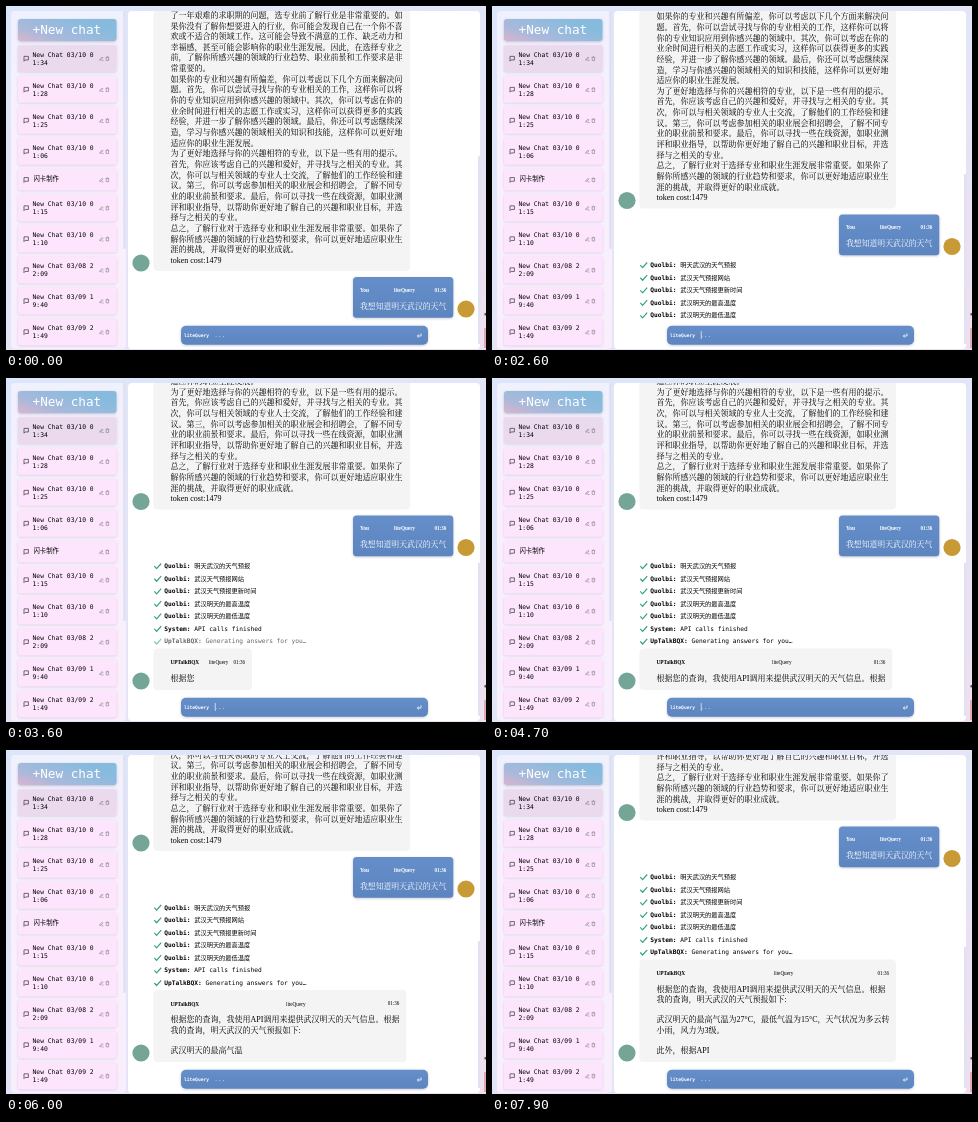
An HTML page that plays this animation: 480x344 px, repeating every 8000 ms.

```html
<!DOCTYPE html>
<html lang="zh">
<head>
<meta charset="utf-8">
<title>Chat</title>
<style>
html, body { margin: 0; width: 100%; height: 100%; overflow: hidden; background: #e4e8f8; }
svg { display: block; width: 100%; height: 100%; }
text { white-space: pre; }
.mono { font-family: "DejaVu Sans Mono", "Noto Sans CJK SC", monospace; }
.serif { font-family: "Liberation Serif", "Noto Serif CJK SC", "Noto Sans CJK SC", serif; }
.b { font-weight: bold; }
</style>
</head>
<body>
<svg id="stage" viewBox="0 0 480 344" preserveAspectRatio="none">
  <defs>
    <linearGradient id="page" x2="1" y2="1">
      <stop offset="0" stop-color="#dce6fa"/><stop offset=".6" stop-color="#e5e5f7"/><stop offset="1" stop-color="#efdfee"/>
    </linearGradient>
    <linearGradient id="side" x2="0" y2="1">
      <stop offset="0" stop-color="#eff1fc"/><stop offset=".35" stop-color="#f9effd"/><stop offset="1" stop-color="#f8eefc"/>
    </linearGradient>
    <linearGradient id="button" x1="0" y1="1" x2=".9" y2=".4">
      <stop offset="0" stop-color="#dcb4cc"/><stop offset=".35" stop-color="#aab9db"/><stop offset="1" stop-color="#86bbde"/>
    </linearGradient>
    <linearGradient id="blue" x2="0" y2="1">
      <stop offset="0" stop-color="#668fca"/><stop offset="1" stop-color="#5c85c0"/>
    </linearGradient>
    <filter id="shadow" x="-10%" y="-30%" width="120%" height="170%">
      <feDropShadow dx="0" dy="0.8" stdDeviation="1.2" flood-color="#4a4a70" flood-opacity=".32"/>
    </filter>
    <filter id="soft" x="-10%" y="-30%" width="120%" height="170%">
      <feDropShadow dx="0" dy="0.6" stdDeviation=".8" flood-color="#8a6a9a" flood-opacity=".3"/>
    </filter>
    <clipPath id="view"><rect x="122" y="5" width="352" height="338" rx="4"/></clipPath>
    <clipPath id="sideView"><rect x="5" y="5" width="115" height="338"/></clipPath>
  </defs>
  <rect width="480" height="344" fill="url(#page)"/>
  <rect x="478" y="322" width="2" height="20" fill="#e0a9b4"/>
  <rect x="478.5" y="307" width="1.5" height="2.5" fill="#555"/>
  <rect x="5" y="5" width="115" height="338" rx="4" fill="url(#side)"/>
  <g id="sidebar" clip-path="url(#sideView)"></g>
  <rect x="122" y="5" width="352" height="338" rx="4" fill="#fff"/>
  <rect id="thumb" x="472" width="2.4" rx="1" fill="#e0e2f4"/>
  <g clip-path="url(#view)"><g id="chat"></g></g>
  <g id="input"></g>
</svg>
<script>
const BOT = "UPTalkBQX", MODE = "liteQuery", ENGINE = "Quolbi";
const LOOP = 8000;

const ARTICLE = `了一年艰难的求职期的问题，选专业前了解行业是非常重要的。如
果你没有了解你想要进入的行业，你可能会发现自己在一个你不喜
欢或不适合的领域工作。这可能会导致不满意的工作、缺乏动力和
幸福感，甚至可能会影响你的职业生涯发展。因此，在选择专业之
前，了解你所感兴趣的领域的行业趋势、职业前景和工作要求是非
常重要的。
如果你的专业和兴趣有所偏差，你可以考虑以下几个方面来解决问
题。首先，你可以尝试寻找与你的专业相关的工作，这样你可以将
你的专业知识应用到你感兴趣的领域中。其次，你可以考虑在你的
业余时间进行相关的志愿工作或实习，这样你可以获得更多的实践
经验，并进一步了解你感兴趣的领域。最后，你还可以考虑继续深
造，学习与你感兴趣的领域相关的知识和技能，这样你可以更好地
适应你的职业生涯发展。
为了更好地选择与你的兴趣相符的专业，以下是一些有用的提示。
首先，你应该考虑自己的兴趣和爱好，并寻找与之相关的专业。其
次，你可以与相关领域的专业人士交流，了解他们的工作经验和建
议。第三，你可以考虑参加相关的职业展会和招聘会，了解不同专
业的职业前景和要求。最后，你可以寻找一些在线资源，如职业测
评和职业指导，以帮助你更好地了解自己的兴趣和职业目标，并选
择与之相关的专业。
总之，了解行业对于选择专业和职业生涯发展非常重要。如果你了
解你所感兴趣的领域的行业趋势和要求，你可以更好地适应职业生
涯的挑战，并取得更好的职业成就。
token cost:1479`.split("\n");

// Search steps: label, text, start and length of the fade
const STEPS = [
  ...["明天武汉的天气预报", "武汉天气预报网站", "武汉天气预报更新时间", "武汉明天的最高温度", "武汉明天的最低温度"]
    .map(q => [ENGINE, q, 1780, 700]),
  ["System", "API calls finished", 2800, 500],
  ["UpTalkBQX", "Generating answers for you…", 3300, 500]
];

// Reply lines with their offset from the end of the article
const REPLY = [
  ["根据您的查询，我使用API调用来提供武汉明天的天气信息。根据", 179.5],
  ["我的查询，明天武汉的天气预报如下:", 190],
  ["武汉明天的最高气温为27°C，最低气温为15°C，天气状况为多云转", 210],
  ["小雨，风力为3级。", 220.5],
  ["此外，根据API", 240.5]
];
const REPLY_START = 3500;
const TYPING = [[3500, 1], [3600, 3], [4700, 30], [6000, 56], [7100, 78], [7900, 97]];

const $ = id => document.getElementById(id);
const clamp = v => Math.max(0, Math.min(1, v));

function add(parent, tag, attrs, content) {
  const el = document.createElementNS("http://www.w3.org/2000/svg", tag);
  for (const key in attrs) el.setAttribute(key, attrs[key]);
  if (content !== undefined) el.textContent = content;
  return parent.appendChild(el);
}
// y is the middle of the line
function label(parent, x, y, size, str, cls = "serif", fill = "#000", more = {}) {
  return add(parent, "text", { x, y: y + size * 0.35, "font-size": size, class: cls, fill, ...more }, str);
}
const box = (parent, x, y, width, height, rx, fill, more = {}) =>
  add(parent, "rect", { x, y, width, height, rx, fill, ...more });
const line = (parent, d, stroke, width) =>
  add(parent, "path", { d, stroke, "stroke-width": width, fill: "none", "stroke-linejoin": "round" });
const avatar = (parent, cx, cy, fill) => add(parent, "circle", { cx, cy, r: 8.6, fill });
const SHADOW = { filter: "url(#shadow)" }, SOFT = { filter: "url(#soft)" };

function buildSidebar() {
  const g = $("sidebar");
  box(g, 12, 13, 98.5, 22, 3, "url(#button)", SHADOW);
  label(g, 26.5, 24, 12.7, "+New chat", "mono", "#fff");
  const chats = ["03/10 01:34", "03/10 01:28", "03/10 01:25", "03/10 01:06", "闪卡制作",
    "03/10 01:15", "03/10 01:10", "03/08 22:09", "03/09 19:40", "03/09 21:49"];
  let y = 39.3;
  chats.forEach((name, i) => {
    const dated = name.includes("/"), h = dated ? 26.5 : 21, mid = y + h / 2;
    box(g, 12, y, 98.5, h, 2, i ? "#fde6fd" : "#ebdaee", SOFT);
    if (dated) {
      label(g, 26.5, mid - 4.2, 6.35, "New Chat " + name.slice(0, 7), "mono");
      label(g, 26.5, mid + 4.1, 6.35, name.slice(7), "mono");
    } else label(g, 27.5, mid - 0.6, 6.35, name, "mono");
    line(g, `M18 ${mid + 2.6}v-4.8h4.4v3.6h-3.2z`, "#333", 0.7);
    line(g, `M93.7 ${mid + 1.7}l.4-1.2 2-2 .8.8-2 2zM95.5 ${mid + 2}h2`, "#666", 0.5);
    line(g, `M99.7 ${mid - 1.3}h3.4M100.2 ${mid - 1.3}v3.2h2.4v-3.2M100.9 ${mid - 2}h1`, "#666", 0.5);
    y += h + 4.5;
  });
  box(g, 117.2, 5, 2.6, 238, 1, "#e0e0f2");
}

// Everything in the chat is placed relative to the article's last line at y = 0
const parts = {};
function buildChat() {
  const g = $("chat");
  const last = ARTICLE.length - 1;
  box(g, 147.5, -300, 256.5, 311, 4, "#f4f4f4");
  ARTICLE.forEach((str, i) => label(g, 164.5, (i - last) * 10.65, 8, str));
  avatar(g, 135, 3, "#75a596");

  box(g, 347, 17, 100.3, 40.8, 3.5, "url(#blue)", SHADOW);
  label(g, 354, 30, 5.4, "You", "serif b", "#fff");
  label(g, 388, 30, 5.2, MODE, "serif b", "#fff");
  label(g, 440.3, 30, 5.1, "01:36", "serif b", "#fff", { "text-anchor": "end" });
  label(g, 354, 46, 7.85, "我想知道明天武汉的天气", "serif", "#fff");
  avatar(g, 460, 49, "#c79a35");

  parts.steps = STEPS.map(([who, what], i) => {
    const y = 67.5 + i * 12.55, step = add(g, "g", {});
    line(step, `M148.3 ${y + 0.2}l2.3 2.5 4.6-5.2`, "#36a37a", 1.2);
    const t = label(step, 158.3, y, 6.22, "", "mono");
    add(t, "tspan", { class: "b" }, who + ": ");
    add(t, "tspan", {}, what);
    return step;
  });

  const r = parts.reply = add(g, "g", {});
  parts.bubble = box(r, 147.5, 150, 98.5, 41, 4, "#f4f4f4");
  label(r, 164.5, 163.7, 5.3, BOT, "serif b");
  parts.mode = label(r, 203, 163.7, 5.2, MODE);
  parts.time = label(r, 239, 163.7, 5.1, "01:36", "serif", "#000", { "text-anchor": "end" });
  parts.lines = REPLY.map(([, y]) => label(r, 164.5, y, 8, ""));
  parts.face = avatar(r, 135, 182, "#75a596");
}

function buildInput() {
  const g = $("input");
  box(g, 175, 319.8, 247, 19, 5, "url(#blue)", SHADOW);
  label(g, 178, 329, 4.62, MODE, "mono b", "#fff");
  label(g, 208.3, 328.7, 6, "...", "mono", "#d3def0");
  parts.caret = box(g, 208.8, 325, 0.8, 8, 0, "#dfe8f6");
  line(g, "M415 327.4v2.6h-3.6M412.8 328.6l-1.5 1.4 1.5 1.4", "#fff", 0.8);
}

function typed(t) {
  for (let i = 1; i < TYPING.length; i++) {
    const [t0, n0] = TYPING[i - 1], [t1, n1] = TYPING[i];
    if (t <= t1) return Math.floor(n0 + (n1 - n0) * (t - t0) / (t1 - t0) + 1e-6);
  }
  return TYPING[TYPING.length - 1][1];
}

function drawReply(t) {
  let left = typed(t), end = 0, width = 0;
  REPLY.forEach(([str, y], i) => {
    const n = Math.max(0, Math.min(left, str.length));
    parts.lines[i].textContent = str.slice(0, n);
    if (n) {
      end = y;
      width = Math.max(width, parts.lines[i].getComputedTextLength());
    }
    left -= str.length;
  });
  const right = Math.max(239, Math.min(397, 164.5 + width));
  parts.bubble.setAttribute("width", right + 7 - 147.5);
  parts.bubble.setAttribute("height", end + 12 - 150);
  parts.time.setAttribute("x", right);
  parts.mode.setAttribute("x", 198 + (right - 164.5 - 65) / 2);
  parts.face.setAttribute("cy", end + 3);
  return 300 - end;
}

function update(now) {
  const t = Math.floor((now % LOOP) / 100) * 100;
  let shown = 0;
  STEPS.forEach(([, , start, length], i) => {
    if (t >= start) shown++;
    parts.steps[i].setAttribute("opacity", clamp((t - start) / length));
  });
  const replying = t >= REPLY_START;
  parts.reply.style.display = replying ? "" : "none";
  const base = replying ? drawReply(t) : 254 - 12.5 * shown;
  $("chat").setAttribute("transform", `translate(0 ${base})`);

  const thumb = 333 * 333 / (844 - base);
  $("thumb").setAttribute("y", 338 - thumb);
  $("thumb").setAttribute("height", thumb);
  parts.caret.style.display = t >= 300 && (t - 300) % 1000 < 500 ? "" : "none";
}

buildSidebar();
buildChat();
buildInput();
const begin = performance.now();
function tick() {
  update(performance.now() - begin);
  requestAnimationFrame(tick);
}
tick();
</script>
</body>
</html>
```
